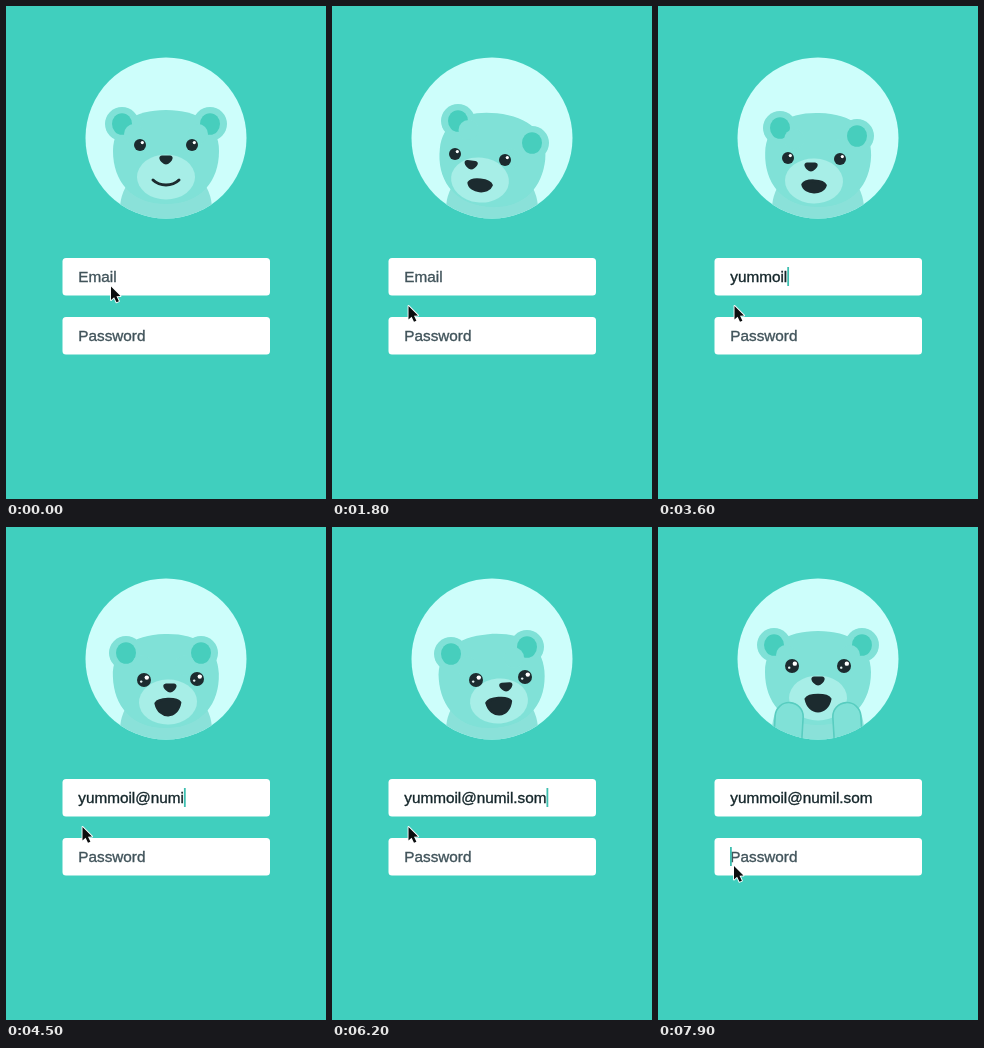
These frames come from a looping animation (320x493 px, 8000 ms). An HTML page with a canvas:

```html
<!DOCTYPE html>
<html lang="en">
<head>
<meta charset="utf-8">
<title>Login bear</title>
<style>
html, body { margin: 0; width: 100%; height: 100%; overflow: hidden; background: #40cfbe; }
canvas { display: block; width: 320px; height: 493px; }
</style>
</head>
<body>
<canvas id="stage"></canvas>
<script>
const canvas = document.getElementById('stage');
const ctx = canvas.getContext('2d');
const W = 320, H = 493, LOOP = 8000;
const dpr = window.devicePixelRatio || 1;
canvas.width = W * dpr;
canvas.height = H * dpr;

const COLOR = {
  bg: '#40cfbe', disc: '#cdfefb', fur: '#80e1d7', body: '#8ae1d9',
  muzzle: '#a7eee7', ear: '#47cebd', dark: '#1c2b2f', arm: '#58cdc0',
  label: '#40535a', text: '#15272b', caret: '#3fbfb0'
};
const ADDRESS = 'yummoil@numil.som';
const KEYS = [2100, 2300, 2500, 2700, 2950, 3200, 3450, 3700, 3900, 4100,
  4300, 4450, 4750, 5000, 5250, 5500, 5800];
const FOCUS = 800, SWITCH = 7500, AT_KEY = KEYS[7];

// Left ear, right ear, left eye, right eye, nose, mouth, head drop, tilt
const REST = [116, 118, 204, 118, 134, 139, 186, 139, 160, 154, 160, 176, 0, 0];
const LOOK = [
  [126, 115, 200, 137, 123, 148, 173, 154, 139, 159, 148, 179, 3, 0.11],
  [124, 120, 199, 133, 128, 151, 180, 154, 149, 161, 153, 180, 3, 0.06],
  [122, 122, 199, 130, 130, 152, 182, 153, 153, 161, 156, 180, 3, 0.03],
  [120, 126, 195, 126, 138, 153, 191, 152, 164, 161, 162, 180, 3, -0.03],
  [119, 127, 195, 120, 144, 153, 193, 150, 174, 160, 167, 179, 3, -0.08]
];
const POSES = [
  [FOCUS, REST], [1750, LOOK[0], expoOut], [2050, LOOK[0]], [2800, LOOK[1]],
  [3600, LOOK[2]], [4500, LOOK[3]], [6000, LOOK[4]], [SWITCH, LOOK[4]],
  [8000, REST, expoOut]
];
// Half width, corner y, upper curve, lower curve, curve spread
const SMILE = [13, -2, 4.7, 4.7, 6];
const MOUTHS = [
  [FOCUS, SMILE], [1150, [11.3, -1, -6.5, 8.2, 9], quadOut],
  [AT_KEY, [11.3, -1, -6.5, 8.2, 9]], [4100, [12, -4, -9, 12, 9], quadOut]
];
const EYES = [[AT_KEY, [6, 0]], [4100, [7, 1], quadOut]];
const POINTER = [
  [1000, [104.5, 280]], [1500, [76, 299.5], easeInOut],
  [7200, [76, 299.5]], [7450, [75.5, 338.5], easeInOut]
];
const ARMS = [[SWITCH, [48]], [7950, [-1], quadOut]];

function expoOut(p) { return p >= 1 ? 1 : 1 - Math.pow(2, -10 * p); }
function quadOut(p) { return p * (2 - p); }
function easeInOut(p) { return p * p * (3 - 2 * p); }

function at(track, t) {
  if (t <= track[0][0]) return track[0][1];
  for (let i = 1; i < track.length; i++) {
    const [end, to, ease] = track[i];
    if (t < end) {
      const [start, from] = track[i - 1];
      let p = (t - start) / (end - start);
      if (ease) p = ease(p);
      return from.map((v, k) => v + (to[k] - v) * p);
    }
  }
  return track[track.length - 1][1];
}

function oval(x, y, rx, ry, fill) {
  ctx.fillStyle = fill;
  ctx.beginPath();
  ctx.ellipse(x, y, rx, ry, 0, 0, Math.PI * 2);
  ctx.fill();
}

function placed(x, y, angle, draw) {
  ctx.save();
  ctx.translate(x, y);
  ctx.rotate(angle);
  draw();
  ctx.restore();
}

function drawHead() {
  ctx.fillStyle = COLOR.fur;
  ctx.beginPath();
  ctx.moveTo(-53, -5);
  ctx.bezierCurveTo(-53, -32, -32, -46, 0, -46);
  ctx.bezierCurveTo(32, -46, 53, -32, 53, -5);
  ctx.bezierCurveTo(53, 25, 35, 48, 0, 48);
  ctx.bezierCurveTo(-35, 48, -53, 25, -53, -5);
  ctx.fill();
}

function drawInnerEar(x, y, side) {
  const drop = y - 118;
  oval(x, y, 10, 10.8, COLOR.ear);
  oval(x + side * (12 + drop * 0.5), y + 10 + drop * 0.3, 10, 10, COLOR.fur);
}

function drawEye(x, y, size, shine) {
  oval(x, y, size, size, COLOR.dark);
  oval(x + 2.3 + shine * 0.5, y - 2.4, 1.6 + shine * 0.6, 1.6 + shine * 0.6, '#fff');
  if (shine > 0) oval(x - 2.8, y + 1.6, 1.2 * shine, 1.2 * shine, '#e4f4f3');
}

function drawNose() {
  ctx.fillStyle = COLOR.dark;
  ctx.beginPath();
  ctx.moveTo(-4, -4.5);
  ctx.lineTo(4, -4.5);
  ctx.bezierCurveTo(8, -4, 7, 0, 4, 2.5);
  ctx.quadraticCurveTo(0, 6.5, -4, 2.5);
  ctx.bezierCurveTo(-7, 0, -8, -4, -4, -4.5);
  ctx.fill();
}

function drawMouth([w, corner, top, bottom, spread]) {
  ctx.fillStyle = ctx.strokeStyle = COLOR.dark;
  ctx.lineWidth = 3;
  ctx.lineCap = ctx.lineJoin = 'round';
  ctx.beginPath();
  ctx.moveTo(-w, corner);
  ctx.bezierCurveTo(-spread, top, spread, top, w, corner);
  ctx.bezierCurveTo(spread, bottom, -spread, bottom, -w, corner);
  ctx.fill();
  ctx.stroke();
}

function drawArm(x, y, side) {
  placed(x, y, side * -0.06, () => {
    ctx.beginPath();
    ctx.roundRect(-14, 0, 28, 70, 14);
    ctx.fillStyle = COLOR.fur;
    ctx.fill();
    ctx.strokeStyle = COLOR.arm;
    ctx.lineWidth = 1.6;
    ctx.stroke();
  });
}

function drawBear(t) {
  const [lx, ly, rx, ry, ex, ey, fx, fy, nx, ny, mx, my, drop, tilt] = at(POSES, t);
  const [size, shine] = at(EYES, t);

  ctx.save();
  ctx.beginPath();
  ctx.arc(160, 132, 80.5, 0, Math.PI * 2);
  ctx.clip();
  ctx.fillStyle = COLOR.disc;
  ctx.fillRect(70, 40, 180, 180);

  oval(160, 203, 46, 46, COLOR.body);
  oval(lx, ly, 17, 17, COLOR.fur);
  oval(rx, ry, 17, 17, COLOR.fur);
  placed(160, 150 + drop, tilt, drawHead);
  drawInnerEar(lx, ly, 1);
  drawInnerEar(rx, ry, -1);
  placed(mx, my - 5, tilt, () => oval(0, 0, 29, 22.5, COLOR.muzzle));
  drawEye(ex, ey, size, shine);
  drawEye(fx, fy, size, shine);
  placed(nx, ny, tilt, drawNose);
  placed(mx, my, tilt, () => drawMouth(at(MOUTHS, t)));

  if (t > SWITCH) {
    const [lift] = at(ARMS, t);
    drawArm(132, 176 + lift, -1);
    drawArm(188, 176 + lift, 1);
  }
  ctx.restore();
}

function drawField(y, text, color) {
  ctx.fillStyle = '#fff';
  ctx.beginPath();
  ctx.roundRect(56.5, y, 207.5, 37.5, 3.5);
  ctx.fill();
  ctx.font = '15.3px "Liberation Sans", Arial, sans-serif';
  ctx.fillStyle = ctx.strokeStyle = color;
  ctx.lineWidth = 0.35;
  ctx.fillText(text, 72.3, y + 24);
  ctx.strokeText(text, 72.3, y + 24);
}

function drawCaret(x, y, since) {
  if (since % 1060 >= 530) return;
  ctx.fillStyle = COLOR.caret;
  ctx.fillRect(x, y + 9, 1.8, 19);
}

function drawForm(t) {
  const typed = KEYS.filter(k => k <= t).length;
  const text = ADDRESS.slice(0, typed);
  drawField(252, text || 'Email', text ? COLOR.text : COLOR.label);
  const end = 72.3 + ctx.measureText(text).width;
  drawField(311, 'Password', COLOR.label);
  if (t >= SWITCH) drawCaret(72, 311, t - SWITCH);
  else if (t >= FOCUS) drawCaret(end, 252, t - (typed ? KEYS[typed - 1] : FOCUS));
}

function drawPointer(x, y) {
  ctx.save();
  ctx.translate(x, y);
  ctx.beginPath();
  [[0.5, 0.5], [0.5, 14], [3.6, 11.2], [6, 16.3], [8.4, 15.2], [6, 10.2], [10, 10]]
    .forEach(([px, py]) => ctx.lineTo(px, py));
  ctx.closePath();
  ctx.lineJoin = 'round';
  ctx.strokeStyle = '#fff';
  ctx.lineWidth = 1.8;
  ctx.stroke();
  ctx.fillStyle = '#0b0d0e';
  ctx.fill();
  ctx.restore();
}

function frame() {
  const t = performance.now() % LOOP;
  ctx.setTransform(dpr, 0, 0, dpr, 0, 0);
  ctx.fillStyle = COLOR.bg;
  ctx.fillRect(0, 0, W, H);
  drawBear(t);
  drawForm(t);
  drawPointer(...at(POINTER, t));
  requestAnimationFrame(frame);
}
frame();
</script>
</body>
</html>
```
